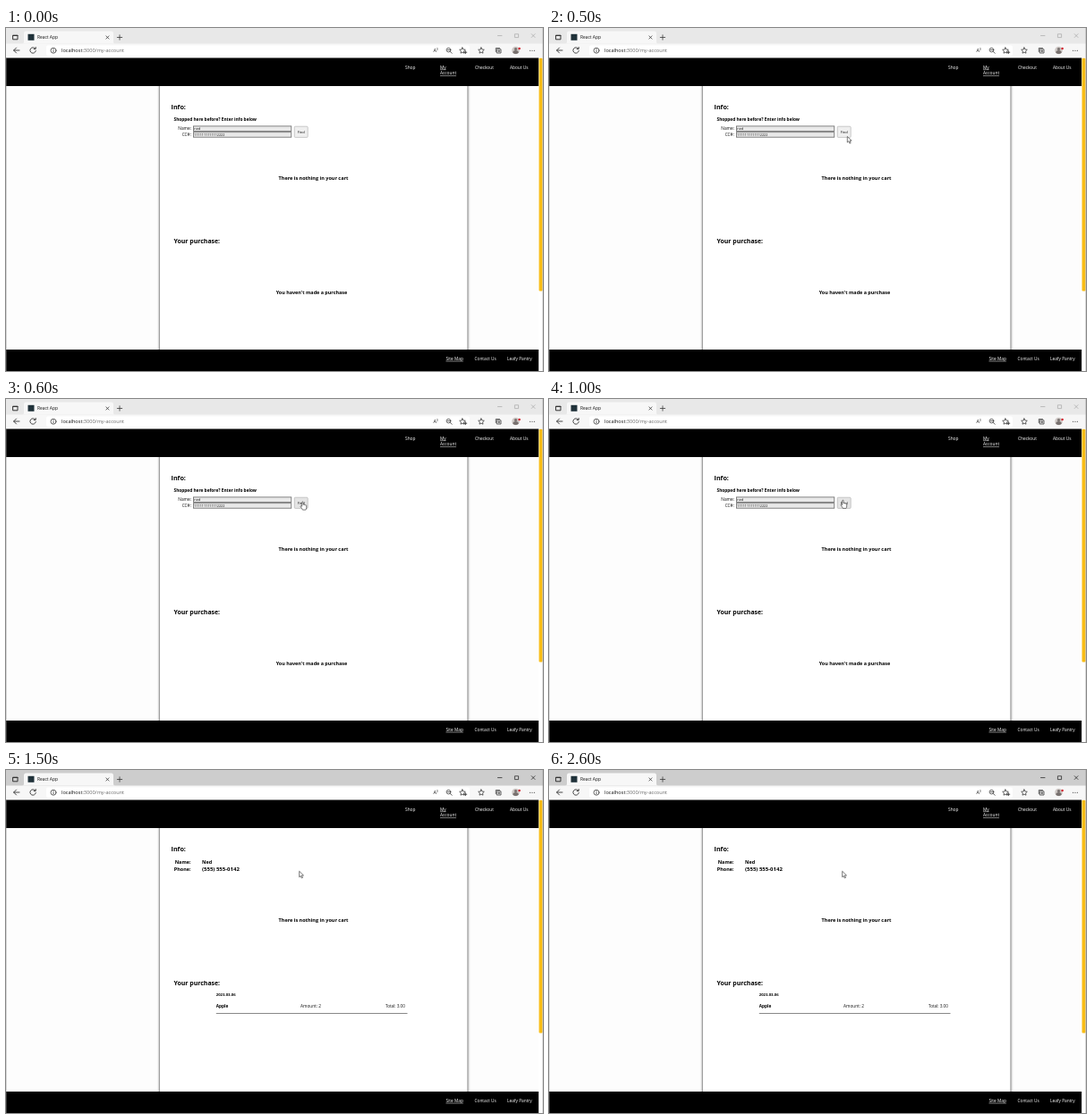
An HTML page for the animation above (2.7 s loop, 600x384 px).

```html
<!DOCTYPE html>
<html lang="en">
<head>
<meta charset="utf-8">
<title>My account</title>
<style>
html, body { margin: 0; height: 100%; overflow: hidden; background: #fff; }
svg { display: block; width: 100vw; height: 100vh; }
text { font: 4.8px "Open Sans", "Noto Sans", sans-serif; fill: #111; }
.b { font-weight: 700; fill: #000; }
.w text { fill: #fff; }
.icon { fill: none; stroke: #333; stroke-width: .75; stroke-linecap: round; stroke-linejoin: round; }
.end { text-anchor: end; }
.mid { text-anchor: middle; }
.u { text-decoration: underline; text-decoration-thickness: .5px; }
.card { fill: #fff; filter: drop-shadow(0 0 1.4px #000); }
</style>
</head>
<body>
<svg viewBox="0 0 600 384" preserveAspectRatio="none">
  <rect width="600" height="384" fill="#fdfdfd"/>
  <rect class="card" x="172" y="55" width="343.5" height="315"/>

  <!-- browser window -->
  <rect id="strip" width="600" height="18"/>
  <rect y="17.5" width="600" height="16" fill="#f7f7f7"/>
  <path d="M18 17.6q2 0 2-2V6q0-2.5 2.5-2.5h95q2.500 0 2.500 2.500v9.600q0 2 2 2z" fill="#f7f7f7"/>
  <rect x="45" y="19.500" width="473" height="11.500" rx="2" fill="#fff"/>
  <rect x="24.500" y="6.800" width="7" height="7" fill="#20323a"/>
  <text x="35" y="12.300" style="font-size:4.900px">React App</text>
  <text x="62" y="27.200" style="font-size:5.580px">localhost<tspan fill="#666">:3000/my-account</tspan></text>
  <g class="icon">
    <path d="M8 8.200h5v4.600h-5zM8 8.500h5" stroke-width="1"/>
    <path d="M111.800 8.900l3.200 3.200m0-3.200l-3.200 3.200M124.300 10.500h5.400M127 7.800v5.400"/>
    <path d="M15 25H8.700m2.800-2.900L8.600 25l2.900 2.900" stroke-width=".9"/>
    <path d="M32.800 23.200a3.200 3.200 0 1 0 .5 2.300M33.200 21.500v2h-2" stroke-width=".9"/>
    <circle cx="53" cy="25.200" r="3"/>
    <path d="M53 24.800v2M53 23.400v.1"/>
    <circle cx="494.500" cy="24.600" r="2.300"/>
    <path d="M496.200 26.300l2 2M493.500 24.600h2"/>
    <path id="star" d="M510 21.900l1 2.100 2.300.3-1.700 1.600.4 2.300-2-1.100-2 1.100.4-2.300-1.700-1.600 2.300-.3z"/>
    <use href="#star" x="21"/>
    <path d="M511.800 27.200h3m-1.500-1.500v3" stroke-width=".9"/>
    <path d="M547.300 26.500v-4h4.200M548.700 23.800h4.300v4.200h-4.300zM549.800 25.900h2.100m-1.050-1v2"/>
    <path d="M585.500 25.200h.1m2.300 0h.1m2.300 0h.1" stroke-width="1.100"/>
  </g>
  <text x="477.500" y="27.300" style="font-size:5.500px">A<tspan dy="-2" style="font-size:3px">))</tspan></text>
  <circle cx="569.500" cy="25" r="4.300" fill="#cfc9c6"/>
  <path d="M566.300 27.800a3.200 2.700 0 0 1 6.400 0q-3.200 2.500-6.400 0z" fill="#77706e"/>
  <circle cx="569.500" cy="23.500" r="1.600" fill="#77706e"/>
  <circle cx="573.600" cy="23" r="1.300" fill="#d22630"/>
  <path id="controls" class="icon" d="M549.500 8.600h4.500M568.800 6.800h3.800v3.800h-3.800zM587.200 6.700l3.800 3.800m0-3.800l-3.800 3.800"/>

  <!-- site header and footer -->
  <path d="M0 33.400h595.300V65H0zM0 360h595.300v24H0z"/>
  <rect x="595.300" y="33.400" width="4.700" height="351" fill="#fff"/>
  <rect x="595.500" y="33.800" width="4" height="260.700" rx="1" fill="#f9bd16"/>
  <path d="M.25 33V384M599.750 0V384" stroke="#999" stroke-width=".5"/>
  <g class="w">
    <text x="446" y="45.600">Shop</text>
    <text class="u" x="485" y="45.600">My</text>
    <text class="u" x="485" y="52.100">Account</text>
    <text x="524" y="45.600">Checkout</text>
    <text x="563" y="45.600">About Us</text>
    <text class="u" x="491.500" y="371.800">Site Map</text>
    <text x="523.500" y="371.800">Contact Us</text>
    <text x="560" y="371.800">Leafy Pantry</text>
  </g>

  <!-- page -->
  <text class="b" x="184.500" y="91" style="font-size:7.200px">Info:</text>
  <text class="b mid" x="343.500" y="170.300" style="font-size:5.520px">There is nothing in your cart</text>
  <text class="b" x="187.500" y="241" style="font-size:6.950px">Your purchase:</text>

  <g id="form">
    <text class="b" x="187.500" y="104.300">Shopped here before? Enter info below</text>
    <text class="end" x="207" y="114.300">Name:</text>
    <text class="end" x="207" y="121.100">CC#:</text>
    <g fill="#e9e9e9" stroke="#666" stroke-width=".8">
      <rect x="209.400" y="109.900" width="109.400" height="5.600"/>
      <rect x="209.400" y="116.700" width="109.400" height="5.500"/>
      <rect id="button" x="322.200" y="110.200" width="15" height="12.200" rx="1" stroke="#aaa" stroke-width=".6"/>
    </g>
    <text x="210.300" y="114.200" style="font-size:3.900px">ned</text>
    <text x="210.300" y="120.900" style="font-size:3.720px">1111111111112222</text>
    <text class="mid" x="329.700" y="117.900" style="font-size:4px">Find</text>
    <text class="b mid" x="341.500" y="298.200" style="font-size:5.430px">You haven't made a purchase</text>
  </g>

  <g id="account">
    <g style="--s:5.450px">
      <text class="b end" x="206.500" y="105.200" style="font-size:var(--s)">Name:</text>
      <text class="b end" x="206.500" y="113.100" style="font-size:var(--s)">Phone:</text>
      <text class="b" x="219" y="105.200" style="font-size:var(--s)">Ned</text>
    </g>
    <text class="b" x="219" y="113.100" style="font-size:6px">(555) 555-0142</text>
    <text class="b" x="234.800" y="253.400" style="font-size:4.200px">2023-03-06</text>
    <text class="b" x="234.800" y="265.500" style="font-size:4.730px">Apple</text>
    <text x="329" y="265.500" style="font-size:4.750px">Amount: 2</text>
    <text x="424" y="265.500" style="font-size:4.580px">Total: 3.00</text>
    <path d="M234.800 272.500H448.500" stroke="#555" stroke-width=".7"/>
  </g>

  <g fill="#fff" stroke="#222" stroke-width=".6" stroke-linejoin="round">
    <path id="arrow" d="M0 0V6.600l1.500-1.400 1.100 2.500 1.200-.5-1.100-2.500h2.100z"/>
    <path id="hand" d="M1.700 5.200V.8q0-.8.7-.8t.7.800v2.500q.800-.6 1.300.2.800-.4 1.200.3.900-.3 1.100.6v2.300q0 1.300-.8 2.400H2.400Q1.700 7.500.2 5.700q-.5-.8.2-1 .6-.1 1.300.5z"/>
  </g>
</svg>
<script>
const $ = id => document.getElementById(id);
const show = (id, on) => $(id).style.display = on ? "" : "none";
const place = (id, x, y) => $(id).setAttribute("transform", `translate(${x} ${y})`);

// pointer position for each 100 ms step from 300 ms
const path = [[346, 320], [339, 184], [333.300, 121.500], [329, 115], [326, 113.300]];

function draw(now) {
  const t = now % 2700;
  const found = t >= 1500;
  const step = Math.min(4, Math.floor(t / 100) - 3);
  const over = !found && step >= 3;

  show("form", !found);
  show("account", found);
  show("arrow", step >= 0 && !over);
  show("hand", over);
  if (found) place("arrow", 327.700, 113.300);
  else if (step >= 0) place(over ? "hand" : "arrow", ...path[step]);

  $("button").setAttribute("fill", over ? "#e4e4e4" : "#efefef");
  $("strip").setAttribute("fill", found ? "#cdcdcd" : "#e8e8e8");
  $("controls").style.stroke = found ? "#222" : "#aaa";
  requestAnimationFrame(draw);
}
draw(performance.now());
</script>
</body>
</html>
```
